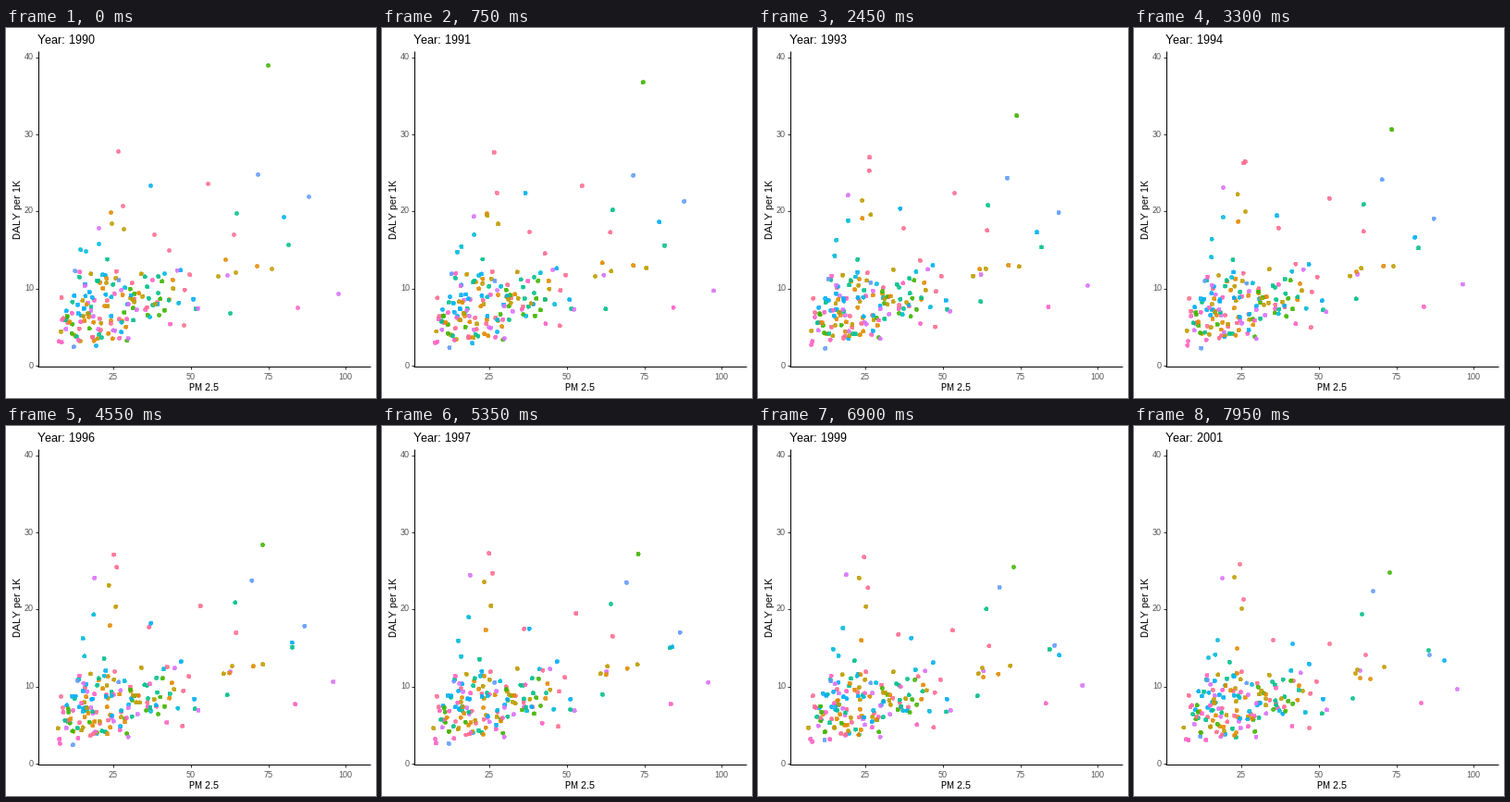
A matplotlib script for the animation above (8 s loop, 400 by 400 pixels).

```python
import math
import random

import matplotlib.pyplot as plt
import numpy as np
from matplotlib.animation import FuncAnimation

# Whole-pixel glyph advances and full hinting for crisp small text
plt.rcParams.update({"font.family": "Liberation Sans",
                     "text.hinting": "native",
                     "text.hinting_factor": 1})

STAGE = 400
FRAMES, STEP = 160, 50
MS_PER_YEAR = 738.9
PT = 0.72  # points per pixel at 100 dpi
X0, X_UNIT = 31.5, 3.35
Y0, Y_UNIT = 364, 8.33

HUES = {"pink": 0, "orange": 42, "mustard": 70, "green": 122, "teal": 165,
        "cyan": 210, "azure": 232, "blue": 255, "lavender": 295, "magenta": 335}
CLOUD_MIX = {"pink": 5, "orange": 4, "mustard": 6, "green": 5, "teal": 7,
             "cyan": 4, "azure": 4, "blue": 1, "lavender": 4, "magenta": 4}


def hcl(hue, chroma=100, light=65):
    """Polar LUV colour as sRGB."""
    a = math.radians(hue)
    u = chroma * math.cos(a) / (13 * light) + 0.1978
    v = chroma * math.sin(a) / (13 * light) + 0.4683
    y = ((light + 16) / 116) ** 3
    x = 2.25 * y * u / v
    z = 3 * y / v - 5 * y - x / 3
    rgb = np.array([[3.2406, -1.5372, -0.4986],
                    [-0.9689, 1.8758, 0.0415],
                    [0.0557, -0.2040, 1.0570]]) @ [x, y, z]
    rgb = np.clip(rgb, 0, 1)
    return np.where(rgb > 0.0031308, 1.055 * rgb ** (1 / 2.4) - 0.055, 12.92 * rgb)


# Outlying points: colour, x path, y path (pixels, evenly spaced in time)
OUTLIERS = [
    ("green", (283, 277.5, 276), (40, 120, 158)),
    ("blue", (272, 266.5, 258), (158, 165, 178)),
    ("blue", (327, 319), (182, 211, 247)),
    ("azure", (300, 306, 335), (204, 230, 253)),
    ("teal", (305, 308, 318), (234, 242)),
    ("teal", (249, 246), (200, 190, 203)),
    ("pink", (218, 210, 211), (168, 189, 235)),
    ("pink", (246, 250), (223, 221, 247)),
    ("lavender", (359, 349), (287, 276, 284)),
    ("magenta", (315, 310), (302, 299)),
    ("mustard", (287, 270), (260, 257, 260)),
    ("orange", (271, 268, 255), (257, 258, 273)),
    ("mustard", (248, 241), (264, 259, 263)),
    ("orange", (237, 244), (250, 265, 272)),
    ("mustard", (229, 239), (268, 267)),
    ("lavender", (239, 244), (267, 264)),
    ("teal", (242, 236), (308, 291, 294)),
    ("pink", (121, 118), (133, 148, 187)),
    ("pink", (126, 117, 114), (192, 141, 149)),
    ("azure", (156, 155, 171), (170, 208, 235)),
    ("lavender", (100, 95.5, 95), (216, 167, 164)),
    ("mustard", (114, 108), (211, 175, 163)),
    ("mustard", (127, 119, 116), (217, 196, 197)),
    ("orange", (113, 111), (199, 212, 240)),
    ("cyan", (100, 90), (233, 203, 231)),
    ("cyan", (86, 80), (241, 228, 250)),
    ("pink", (160, 150), (223, 216, 231)),
    ("pink", (176, 172), (240, 275)),
    ("pink", (192, 189), (321, 326)),
]


def cloud(rng, count, left, span, shape, low, high, skew):
    """Dense points that drift left and draw slowly towards the middle."""
    names, weights = zip(*CLOUD_MIX.items())
    points = []
    for _ in range(count):
        x = left + span * rng.betavariate(*shape)
        top = min(high, 9 + 0.25 * (x - 54))
        start = low + (top - low) * rng.betavariate(*skew)
        end = max(low, 7.5 + 0.88 * (start - 7.5) + rng.gauss(0, 0.7))
        half = max(low, (start + end) / 2 + rng.gauss(0, 0.4))
        ys = tuple(Y0 - Y_UNIT * v for v in (start, half, end))
        name = rng.choices(names, weights)[0]
        points.append((name, (x, x + rng.gauss(-0.5, 3)), ys))
    return points


def coeffs(path):
    """Polynomial through the path, padded to a quadratic."""
    n = len(path)
    c = np.polyfit(np.linspace(0, 1, n), path, n - 1)
    return np.pad(c, (3 - n, 0))


rng = random.Random(1990)
points = cloud(rng, 118, 53, 92, (1.7, 1.8), 2.2, 16, (1.8, 2.9))
points += cloud(rng, 36, 140, 73, (1.1, 1.8), 4.8, 13, (2, 2.1))
points += OUTLIERS
rng.shuffle(points)

colors = [hcl(HUES[name]) for name, _, _ in points]
xc = np.array([coeffs(p[1]) for p in points])
yc = np.array([coeffs(p[2]) for p in points])

fig = plt.figure(figsize=(4, 4), dpi=100, facecolor="white")
ax = fig.add_axes([0, 0, 1, 1])
ax.set_xlim(-0.5, STAGE - 0.5)
ax.set_ylim(STAGE - 0.5, -0.5)
ax.axis("off")


def line(xs, ys, color):
    ax.plot(xs, ys, color=color, lw=PT, solid_capstyle="butt")


def label(x, y, text, size, color="black", ha="center", **kw):
    return ax.text(x, y, text, fontsize=size * PT, color=color, ha=ha,
                   va="baseline", **kw)


for value in range(0, 41, 10):
    y = round(Y0 - Y_UNIT * value)
    line([31, 34], [y, y], "#333333")
    label(29.5, y + 3, str(value), 9, "#4d4d4d", "right")
for value in range(25, 101, 25):
    x = round(X0 + X_UNIT * value)
    line([x, x], [365, 368], "#333333")
    label(x, 379, str(value), 9, "#4d4d4d")
line([34, 34], [24, 365.5], "black")
line([33.5, 393.5], [365, 365], "black")

label(213.7, 392, "PM 2.5", 11)
label(15, 195, "DALY per 1K", 11, rotation=90, rotation_mode="anchor")
title = label(33.7, 16.5, "", 13, ha="left")

dots = ax.scatter(np.zeros(len(points)), np.zeros(len(points)),
                  s=(3 * PT) ** 2, c=colors, edgecolors=colors,
                  linewidths=PT, alpha=0.7, antialiased=False, zorder=3)


def update(i):
    u = i / (FRAMES - 1)
    basis = np.array([u * u, u, 1])
    dots.set_offsets(np.column_stack([xc @ basis, yc @ basis]))
    title.set_text(f"Year: {1990 + round(i * STEP / MS_PER_YEAR)}")
    return dots, title


anim = FuncAnimation(fig, update, frames=FRAMES, interval=STEP,
                     repeat=True, repeat_delay=0)
plt.show()
```
